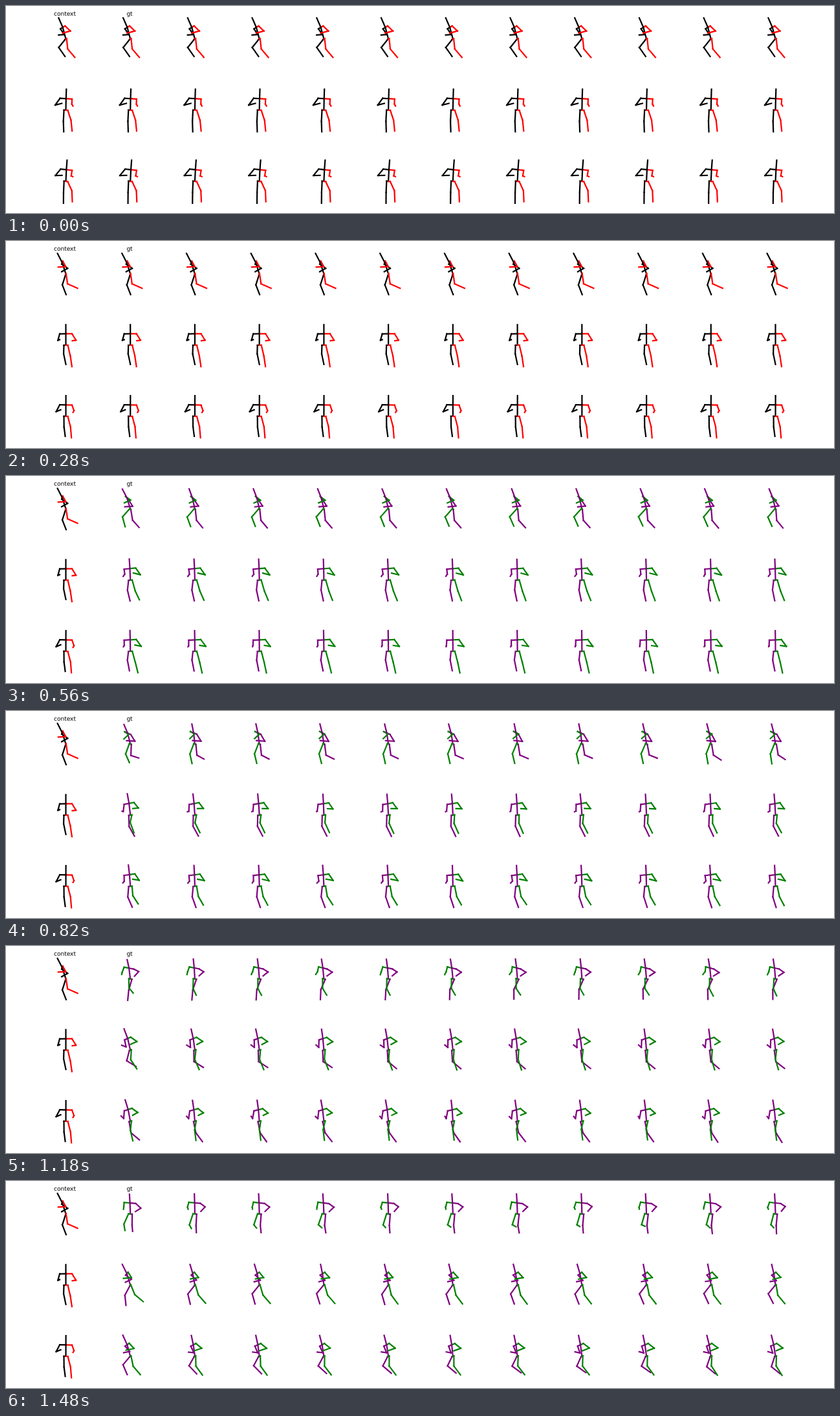
Recreate the animation shown at these times as an HTML page with a canvas. Size 1280 by 320 pixels, loop 1.5 s.

```html
<!DOCTYPE html>
<html lang="en">
<head>
<meta charset="utf-8">
<title>Pose prediction</title>
<style>
  html, body { margin: 0; width: 100%; height: 100%; overflow: hidden; background: #fff; }
  canvas, svg { position: absolute; left: 0; top: 0; width: 1280px; height: 320px; }
  text { font: 9px "DejaVu Sans", sans-serif; text-anchor: middle; }
</style>
</head>
<body>
<canvas id="stage" width="1280" height="320"></canvas>
<svg viewBox="0 0 1280 320"><text x="91" y="15">context</text><text x="191" y="15">gt</text></svg>
<script>
const LOOP = 1500, STEP = 20, SPLIT = 300, LAST = 280;
const COLS = 12, GAP = 99.73, ROOT_X = 92.5, ROOT_Y = 51, ROW_H = 110;

// All rows show one run along a left-hand curve, from different moments on
const ROW_START = [1305, 0, -130];
const CYCLE = 1000, LEFT_START = 1190;
const TURN_START = 230, TURN_SPEED = 0.063;
const COS_ELEV = 0.97, SIN_ELEV = 0.25;

const { sin, cos, abs, min, max, PI } = Math;
const rad = deg => deg * PI / 180;
const ramp = (t, from, to) => min(1, max(0, (t - from) / (to - from)));
const mix = (a, b, u) => a + (b - a) * u;

// Cosine over the gait cycle that peaks at the given time, n times per cycle
const beat = (time, peak, n = 1) => cos(2 * PI * n * (time - peak) / CYCLE);

// Joint angles in degrees from straight down, positive is forward
const thighAngle = p => 11 + 25 * beat(p, 225) + 8 * beat(p, 85, 2);
const shinAngle = p => -37 + 24 * beat(p, 340) + 13 * beat(p, 240, 2);
const upperArmAngle = p => -40 - 20 * beat(p, 330);
const forearmAngle = p => 76 - 18 * beat(p, 380);

// Body space: right, forward, up
const limb = (from, length, angle, right) => [
  from[0] + right,
  from[1] + length * sin(rad(angle)),
  from[2] - length * cos(rad(angle))
];

function arm(chest, side, p) {
  const shoulder = [chest[0] + side * 9.5, chest[1], chest[2]];
  const elbow = limb(shoulder, 11, upperArmAngle(p), side * (4.5 - 2.5 * beat(p, 250)));
  const wrist = limb(elbow, 11, forearmAngle(p), -side * (4.2 - 3.5 * beat(p, 300)));
  return [shoulder, elbow, wrist];
}

function leg(side, p, effort) {
  const hip = [side * 3, 0, 0];
  const knee = limb(hip, 17.5, thighAngle(p) * effort, 2 + side * 2);
  const ankle = limb(knee, 17, shinAngle(p) * effort, 2.5 - side * 0.5);
  return [hip, knee, ankle];
}

function pose(time, style) {
  const yaw = rad((time - TURN_START) * TURN_SPEED + style.turn);
  const project = ([r, f, u]) => {
    const near = -r * sin(yaw) - f * cos(yaw);
    return [r * cos(yaw) - f * sin(yaw), near * SIN_ELEV - u * COS_ELEV];
  };
  const lean = style.lean * abs(sin(yaw));
  const effort = mix(0.65, 1, ramp(time, 0, 1300)) * style.swing;
  const left = time - LEFT_START, right = left + CYCLE / 2;
  const pelvis = [0, 0, 0], chest = [0, lean * 0.43, 18], head = [0, lean, 32.5];
  const chains = [
    [pelvis, chest],
    [chest, ...arm(chest, -1, left)],
    [chest, ...arm(chest, 1, right)],
    [pelvis, ...leg(-1, left, effort)],
    [pelvis, ...leg(1, right, effort)],
    [chest, head]
  ];
  return chains.map(chain => chain.map(project));
}

function random(seed) {
  return () => {
    seed = (seed * 1664525 + 1013904223) % 4294967296;
    return seed / 4294967296;
  };
}

const REAL = { lag: 0, turn: 0, lean: 13, swing: 1 };

// A prediction runs a little late, leans less, and drifts away from the real motion
function makeGuess(row, col) {
  const next = random(row * 9173 + col * 52711 + 7);
  next();
  const around = (mid, spread) => mid + spread * (2 * next() - 1);
  return { lag: around(0.1, 0.03), turn: around(0, 5), lean: around(7, 1.5), swing: around(0.95, 0.08) };
}
const guesses = ROW_START.map((_, row) => Array.from({ length: COLS }, (_, col) => makeGuess(row, col)));

function guessPose(row, col, t) {
  const g = guesses[row][col], u = ramp(t, LAST, 800);
  const lag = max(0, t - LAST) * g.lag;
  return pose(ROW_START[row] + t - lag, {
    turn: g.turn * u,
    lean: mix(REAL.lean, g.lean, u),
    swing: mix(REAL.swing, g.swing, u)
  });
}

const ctx = document.getElementById("stage").getContext("2d");
ctx.lineWidth = 2.2;
ctx.lineCap = "square";

function figure(row, col, chains, [left, right]) {
  const x = ROOT_X + GAP * col, y = ROOT_Y + ROW_H * row;
  chains.forEach((chain, i) => {
    ctx.strokeStyle = i === 2 || i === 4 ? right : left;
    for (let j = 1; j < chain.length; j++) {
      ctx.beginPath();
      ctx.moveTo(x + chain[j - 1][0], y + chain[j - 1][1]);
      ctx.lineTo(x + chain[j][0], y + chain[j][1]);
      ctx.stroke();
    }
  });
}

function draw() {
  const t = Math.floor(performance.now() % LOOP / STEP) * STEP;
  const seen = ["black", "red"], future = ["purple", "green"];
  const colors = t < SPLIT ? seen : future;
  ctx.clearRect(0, 0, 1280, 320);
  ROW_START.forEach((start, row) => {
    figure(row, 0, pose(start + min(t, LAST), REAL), seen);
    figure(row, 1, pose(start + t, REAL), colors);
    for (let col = 2; col < COLS; col++) figure(row, col, guessPose(row, col, t), colors);
  });
  requestAnimationFrame(draw);
}
draw();
</script>
</body>
</html>
```
